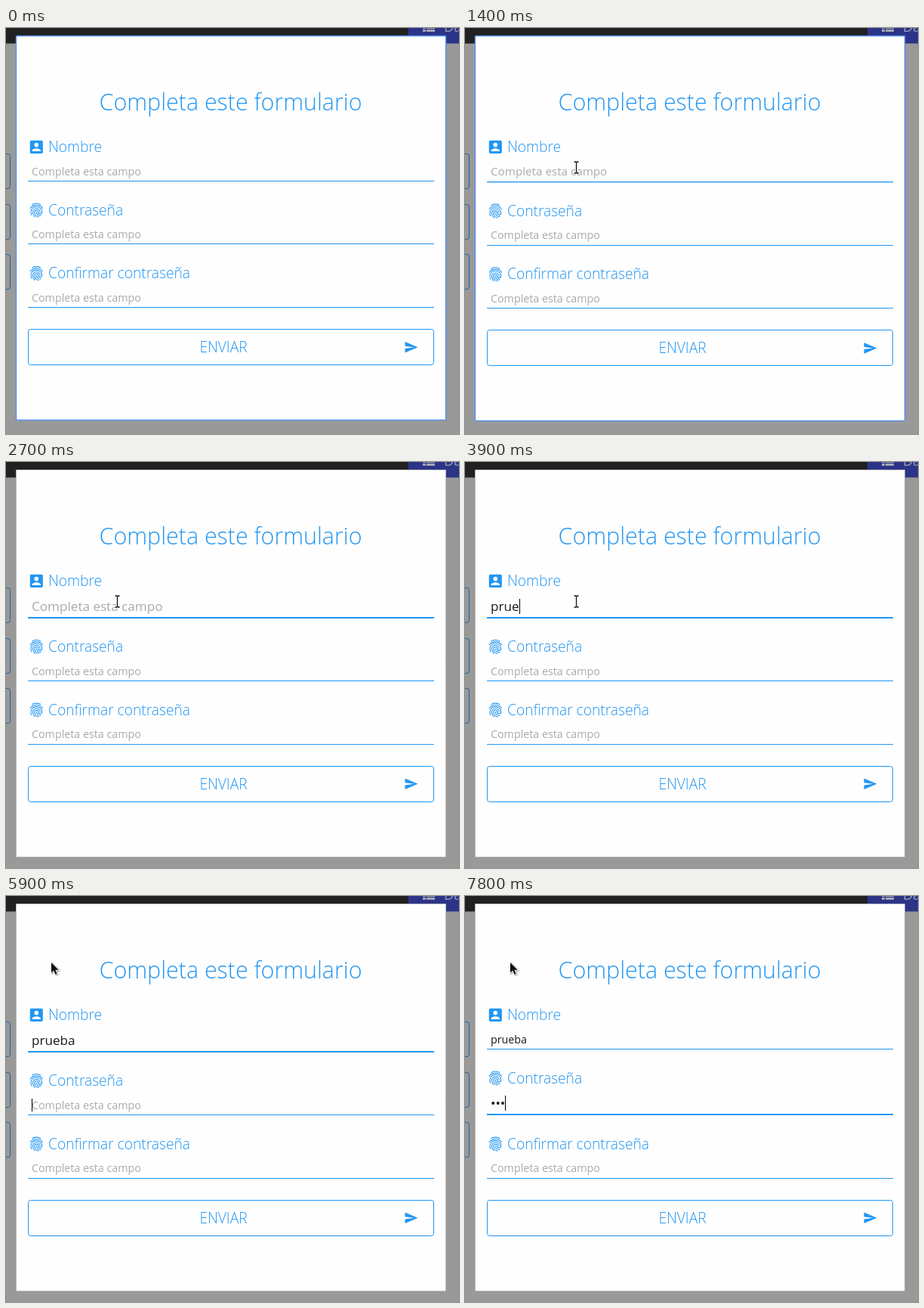
An HTML page with a canvas for the animation above (8 s loop, 600 by 537 pixels).

```html
<!DOCTYPE html>
<html lang="es">
<head>
<meta charset="utf-8">
<title>Formulario</title>
<style>
html, body { margin: 0; width: 600px; height: 537px; overflow: hidden; background: #999; }
canvas { display: block; }
</style>
</head>
<body>
<canvas id="stage" width="600" height="537"></canvas>
<script>
const ctx = document.getElementById('stage').getContext('2d');
const BLUE = '#2196f3', LOOP = 8000, STEP = 100, PITCH = 83.6, GROW = 3.5;

const icons = {
  person: new Path2D('M3 5v14a2 2 0 0 0 2 2h14a2 2 0 0 0 2-2V5a2 2 0 0 0-2-2H5a2 2 0 0 0-2 2zM15 9a3 3 0 0 1-6 0 3 3 0 0 1 6 0zM6 17c0-2 4-3.1 6-3.1s6 1.1 6 3.1v1H6z'),
  finger: new Path2D('M6.2 4Q12 1 17.8 4M3.5 9.2C7.5 3.6 16.5 3.6 20.5 9.2M9.75 21.3C7.7 19.2 6.84 17.2 6.84 14.7A5.16 4.9 0 0 1 17.16 14.7M11.94 14.7C11.9 18 15 20.2 18.1 19.4M5 18.7C4.2 16.5 4 13.7 5 11.5A7.75 7.33 0 0 1 19.72 14.66a2.58 2.44 0 0 1-5.16 0a2.58 2.44 0 0 0-5.16 0C9.4 18.2 11.5 20.7 14.9 21.5'),
  send: new Path2D('M2 21L23 12 2 3v7l15 2-15 2z'),
  arrow: new Path2D('M0 0v15l3.5-3.3 2.6 5.8 2.4-1.1-2.5-5.6h4.8z'),
  beam: new Path2D('M-3-7.5h2l1 1 1-1h2M0-6.5v13M-3 7.5h2l1-1 1 1h2')
};

const clamp = v => Math.max(0, Math.min(1, v));
const ramp = (t, start) => clamp((t - start) / 300);
const lerp = (a, b, k) => a + (b - a) * k;
const within = (t, a, b) => t >= a && t < b;
const typed = (t, text, times) => text.slice(0, times.filter(at => t >= at).length);

function rect(x, y, w, h, color) {
  ctx.fillStyle = color;
  ctx.fillRect(x, y, w, h);
}

function outline(x, y, w, h, color, radius = 3, width = 1) {
  ctx.strokeStyle = color;
  ctx.lineWidth = width;
  ctx.beginPath();
  ctx.roundRect(x, y, w, h, radius);
  ctx.stroke();
}

function write(text, x, y, size, color = BLUE, weight = 300, align = 'left') {
  ctx.font = `${weight} ${size}px "Open Sans", sans-serif`;
  ctx.textAlign = align;
  ctx.fillStyle = color;
  ctx.fillText(text, x, Math.round(y));
}

function place(x, y, scale, draw) {
  ctx.save();
  ctx.translate(x, y);
  ctx.scale(scale, scale);
  draw();
  ctx.restore();
}

function icon(path, x, y, scale, stroked) {
  place(x, y, scale, () => {
    ctx.fillStyle = ctx.strokeStyle = BLUE;
    ctx.lineWidth = 1.15;
    ctx.lineCap = 'round';
    if (stroked) ctx.stroke(path);
    else ctx.fill(path, 'evenodd');
  });
}

function page() {
  rect(0, 0, 600, 537, '#999');
  rect(0, 0, 533, 20.5, '#212121');
  rect(533, 0, 67, 20.5, '#2c3488');
  for (const y of [-2, 2]) {
    rect(552, y, 4, 3, '#a4a6b0');
    rect(557, y, 11, 3, '#a4a6b0');
  }
  write('Da', 580, 5, 18, '#999cb0', 400);
  for (let i = 0; i < 3; i++) outline(-20.5, 166.5 + Math.round(i * 66.6), 26, 46, '#1a5f9c');
}

function field(index, label, shift, focus, value, caret) {
  const dy = index * PITCH + shift;
  const size = lerp(14.27, 17.1, focus);
  const base = 194.6 + dy + 2.2 * focus;
  icon(index ? icons.finger : icons.person, 28.9, 146 + dy, 0.95, index);
  write(label, 56, 164.1 + dy, 19.2);
  write(value || 'Completa esta campo', 34, base, size, value ? '#1a1a1a' : '#aaa', 400);
  if (caret) {
    const x = 34 + ctx.measureText(value).width;
    rect(Math.round(x), Math.round(base - size * 0.93), 1, Math.round(size * 1.165), '#000');
  }
  rect(29, Math.round(201.85 + dy + 3 * focus), 538, 1 + focus, BLUE);
}

function beam(x, y) {
  place(x, y, 1, () => {
    for (const [color, width] of [['#fff', 3], ['#111', 1.3]]) {
      ctx.strokeStyle = color;
      ctx.lineWidth = width;
      ctx.stroke(icons.beam);
    }
  });
}

function arrow(x, y) {
  place(x, y, 0.9, () => {
    ctx.shadowColor = 'rgba(0,0,0,.45)';
    ctx.shadowBlur = 2;
    ctx.shadowOffsetX = ctx.shadowOffsetY = 1;
    ctx.strokeStyle = '#fff';
    ctx.lineWidth = 1.6;
    ctx.stroke(icons.arrow);
    ctx.shadowColor = 'transparent';
    ctx.fillStyle = '#111';
    ctx.fill(icons.arrow);
  });
}

function pointer(t) {
  if (t < 500) return;
  if (t < 5300) {
    const k = clamp((t - 500) / 600);
    const settle = clamp((t - 1200) / 200);
    const y = lerp(180, 173.5, k) - 32 * k * (1 - k) * (1 - k) + 10.5 * settle;
    beam(Math.round(lerp(37, 147, k)) + 0.5, Math.round(y) + 0.5);
  } else {
    const k = 1 - (1 - clamp((t - 5200) / 300)) ** 2;
    arrow(lerp(147, 60, k), lerp(184, 88, k));
  }
}

function draw(t) {
  const second = ramp(t, 5900);
  const first = ramp(t, 1300) - second;
  const shift = GROW * (first + second);
  const step = Math.round(shift);
  const name = typed(t, 'prueba', [3500, 3700, 3800, 3900, 4100, 4200]);
  const secret = typed(t, '•••', [7500, 7600, 7800]);
  const nameCaret = within(t, 2100, 2700) || within(t, 3300, 4800) || within(t, 5300, 5900);
  const secretCaret = within(t, 5900, 6800) || t >= 7400;

  page();
  rect(14, 11, 568, 507 + step, '#fefefe');
  outline(13.5, 10.5, 569, 508 + step, '#b8b8b8', 0);
  if (t < 2100) outline(13.5, 10.5, 569, 508 + step, 'rgba(77,144,254,.85)', 1, 1.6);
  write('Completa este formulario', 297.5, 109, 30.4, BLUE, 300, 'center');
  field(0, 'Nombre', 0, first, name, nameCaret);
  field(1, 'Contraseña', GROW * first, second, secret, secretCaret);
  field(2, 'Confirmar contraseña', shift, 0, '', false);
  outline(29.5, 398.5 + step, 537, 47, BLUE);
  write('ENVIAR', 288, 429 + shift, 19.2, BLUE, 300, 'center');
  icon(icons.send, 526.9, 412.6 + shift, 0.81);
  pointer(t);
}

function tick() {
  draw(Math.floor(performance.now() % LOOP / STEP) * STEP);
  requestAnimationFrame(tick);
}
tick();
</script>
</body>
</html>
```
